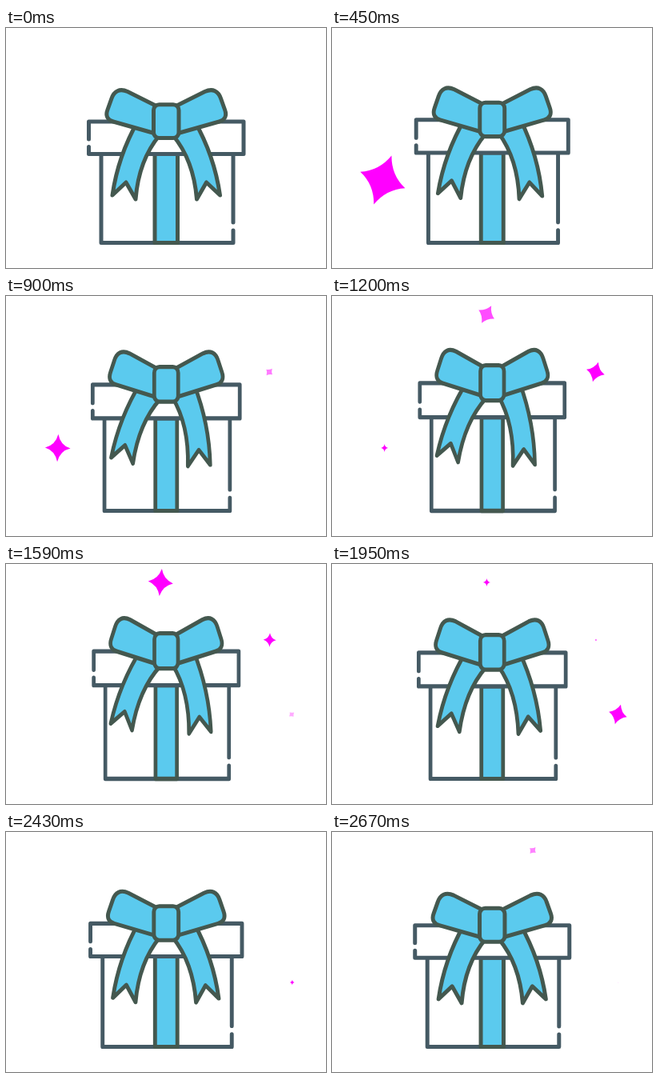
An HTML page with a canvas for the animation above (2.7 s loop, 400 by 300 pixels).

```html
<!DOCTYPE html>
<html lang="en">
<head>
<meta charset="utf-8">
<title>Gift box</title>
<style>
  html, body { margin: 0; width: 100%; height: 100%; overflow: hidden; background: #fff; }
  canvas { display: block; }
</style>
</head>
<body>
<canvas id="stage" width="400" height="300"></canvas>
<script>
const LOOP = 2700;
const ctx = document.getElementById("stage").getContext("2d");
const clamp = v => Math.min(1, Math.max(0, v));
const span = (t, from, to) => clamp((t - from) / (to - from));
const smooth = u => u * u * (3 - 2 * u);
const swing = (t, peak, end) => smooth(span(t, 0, peak)) - smooth(span(t, peak, end));

const BOX = ["#fff", "#455a64"], BOW = ["#5bcaee", "#44584f"];
const body = new Path2D("M284 243V157H119V268.5H284V253");
const lid = new Path2D("M103.5 139V117H297V157.5H103.5V148.5");
const band = new Path2D("M186 157.5H214.5V268.5H186Z");
const tail = new Path2D("M165 116Q140 160 133 209L150 193L162 214Q166 165 192 134Z");
const wing = new Path2D("M187 97L152 79.5C142 75 135 79 132 88L127 102C124 110 127 115 134 117L187 132Z");
const knot = new Path2D();
knot.roundRect(184.5, 95.7, 31.5, 41.8, 7);

const stars = [
  { x: 62, y: 190, drift: 4, radius: 34.5, start: 0, peak: 480, end: 1320, fall: 1 },
  { x: 329, y: 95, drift: 1, radius: 15, start: 680, peak: 1290, end: 2010, fall: 1 },
  { x: 193, y: 23, drift: 0.5, radius: 22, start: 900, peak: 1440, end: 2100, fall: 1 },
  { x: 357, y: 188, drift: 1, radius: 13.5, start: 1450, peak: 1920, end: 2760, fall: 1.6 },
  { x: 251, y: 23, drift: 0, radius: 11, start: 2460, peak: 2900, end: 3700, fall: 1 }
];

function withTransform(apply, paint) {
  ctx.save();
  apply();
  paint();
  ctx.restore();
}

function shape(path, [fill, stroke]) {
  ctx.fillStyle = fill;
  ctx.strokeStyle = stroke;
  ctx.fill(path);
  ctx.stroke(path);
}

function rotateAbout(x, y, degrees) {
  ctx.translate(x, y);
  ctx.rotate(degrees * Math.PI / 180);
  ctx.translate(-x, -y);
}

const mirror = () => ctx.transform(-1, 0, 0, 1, 400.5, 0);

function drawGift(t) {
  const half = LOOP / 2;
  const stretch = smooth(span(t, 0, half)) - span(t, half, LOOP) ** 1.7;
  ctx.translate(200.5, 268.5);
  ctx.scale(1 - 0.067 * stretch, 1 + 0.055 * stretch);
  ctx.translate(-200.5, -268.5);
  ctx.lineWidth = 5;
  ctx.lineCap = ctx.lineJoin = "round";
  shape(body, BOX);
  shape(band, BOW);
  shape(lid, BOX);
  withTransform(() => rotateAbout(190, 140, 6.2 * swing(t, 1410, LOOP)), () => shape(tail, BOW));
  withTransform(() => {
    rotateAbout(226, 130, 7.3 * swing(t, 1110, 2520));
    mirror();
  }, () => shape(tail, BOW));
  shape(wing, BOW);
  withTransform(mirror, () => shape(wing, BOW));
  shape(knot, BOW);
}

function drawStar({ x, y, drift, radius, start, peak, end, fall }, t) {
  const life = span(t, start, end);
  const size = radius * (t < peak ? span(t, start, peak) : (1 - span(t, peak, end)) ** fall);
  const waist = 0.36 - 0.24 * life;
  ctx.translate(x + drift * life, y);
  ctx.rotate(70 * (1 - life) ** 3 * Math.PI / 180);
  ctx.scale(0.92 * size, size);
  ctx.globalAlpha = span(t, start, start + 430);
  ctx.fillStyle = "#f0f";
  ctx.beginPath();
  ctx.moveTo(0, -1);
  ctx.quadraticCurveTo(waist, -waist, 1, 0);
  ctx.quadraticCurveTo(waist, waist, 0, 1);
  ctx.quadraticCurveTo(-waist, waist, -1, 0);
  ctx.quadraticCurveTo(-waist, -waist, 0, -1);
  ctx.fill();
}

function draw(t) {
  ctx.clearRect(0, 0, 400, 300);
  withTransform(() => {}, () => drawGift(t));
  for (const star of stars) {
    if (t > star.start && t < star.end) withTransform(() => {}, () => drawStar(star, t));
  }
}

const origin = performance.now();
function tick() {
  draw((performance.now() - origin) % LOOP);
  requestAnimationFrame(tick);
}
tick();
</script>
</body>
</html>
```
